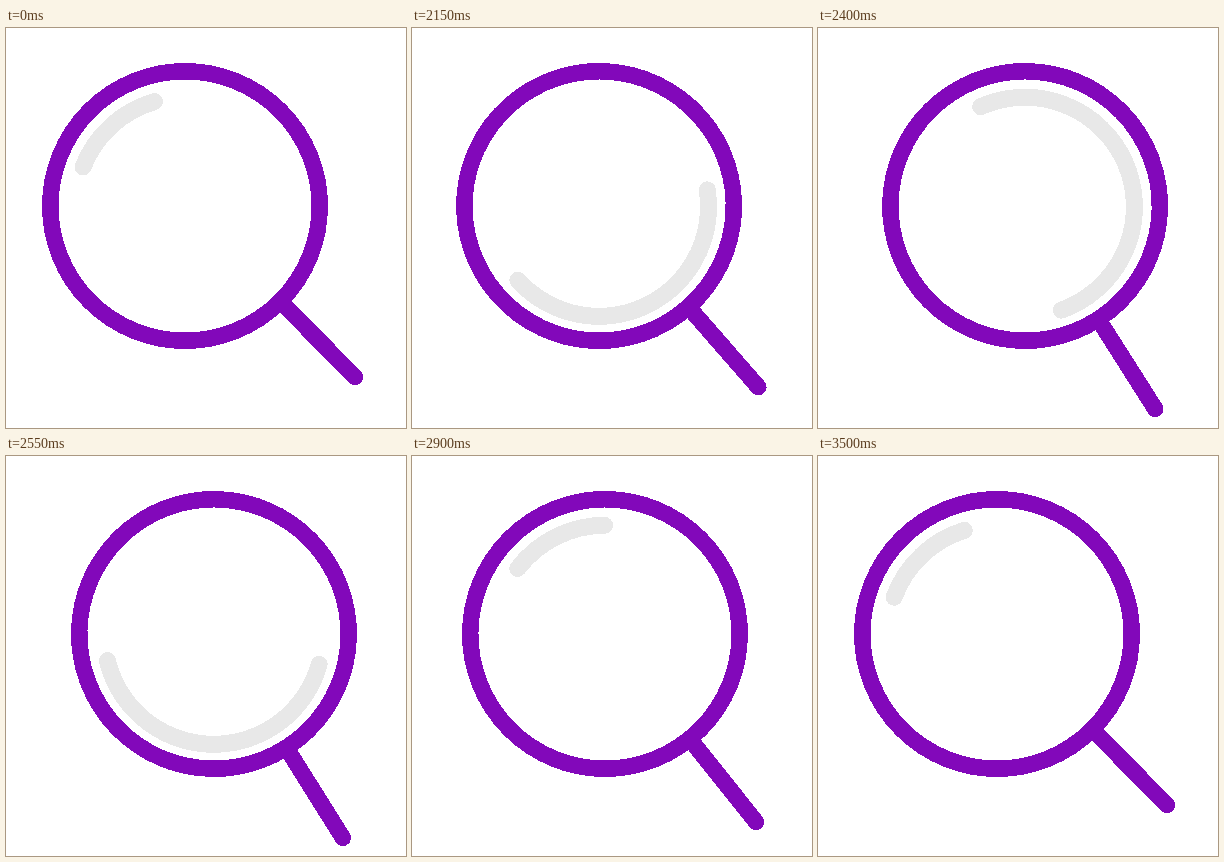
An HTML page for the animation above (3520 ms loop, 400x400 px).

```html
<!DOCTYPE html>
<html>
<head>
<meta charset="utf-8">
<style>
  html, body { margin: 0; width: 100%; height: 100%; overflow: hidden; background: #fff; }
  svg { display: block; fill: none; stroke-linecap: round; shape-rendering: crispEdges; }
</style>
</head>
<body>
<svg width="400" height="400" viewBox="0 0 400 400">
  <g id="lens">
    <circle id="glint" cy="0.8" r="109.5" pathLength="360" stroke="#e8e8e8" stroke-width="17"/>
    <g stroke="#8208ba" stroke-width="16.5">
      <circle r="134.75"/>
      <path d="M97 97L170 171"/>
    </g>
  </g>
</svg>
<script>
const lens = document.getElementById('lens');
const glint = document.getElementById('glint');
const LOOP = 3520;
const MOVE_START = 2020;

const progress = (t, from, to) => Math.min(1, Math.max(0, (t - from) / (to - from)));

// Smooth drop from 1 to 0; a higher power drops sooner.
const drop = (u, power) => (1 - u ** 1.8) ** power;

// The lens leans to the right, then returns more slowly.
function lean(t) {
  return t < 2490
    ? 1 - drop(progress(t, 2000, 2490), 2.5)
    : drop(progress(t, 2490, 3500), 3.4);
}

// Two turns that overshoot by 10 degrees and wobble to rest.
function spin(t) {
  if (t < 2900) return 730 * (1 - (1 - progress(t, 2016, 2900)) ** 1.35);
  const since = t - 2900;
  return 720 + 10 * Math.exp(-since / 350) * Math.cos(since / 70);
}

function glintLength(t) {
  const u = progress(t, 2016, 2900);
  return 52.5 + 825 * u * (1 - u) ** 1.75;
}

function draw(now) {
  const time = now % LOOP;
  const t = time < MOVE_START ? 0 : time;
  const p = lean(t);
  lens.setAttribute('transform', `translate(${179 + 29.6 * p} 178) rotate(${12.8 * p})`);
  glint.setAttribute('transform', `rotate(${201.3 + spin(t)} 0 0.8)`);
  glint.setAttribute('stroke-dasharray', `${glintLength(t)} 360`);
}

const start = performance.now();
function tick() {
  draw(performance.now() - start);
  requestAnimationFrame(tick);
}
tick();
</script>
</body>
</html>
```
